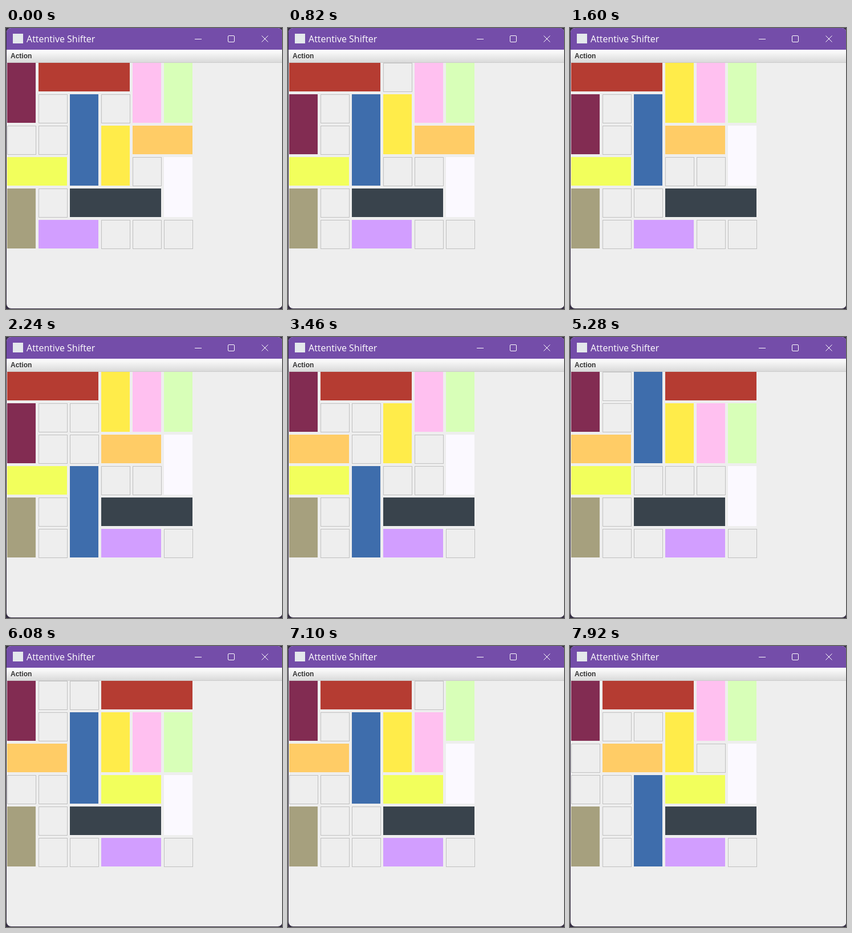
An HTML page with a canvas that plays this animation: 484 px wide and 492 px high, repeating every 8000 ms.

```html
<!DOCTYPE html>
<html lang="en">
<head>
<meta charset="utf-8">
<title>Sliding blocks</title>
<style>
html, body { margin: 0; width: 100%; height: 100%; overflow: hidden; background: #eee; }
canvas { display: block; width: 484px; height: 492px; }
</style>
</head>
<body>
<canvas id="stage" width="484" height="492"></canvas>
<script>
const ctx = document.getElementById('stage').getContext('2d');
const LOOP = 8000, GRID = 6, PITCH = 55, CELL = 50, LEFT = 2, TOP = 61;

// Each block: axis, fixed lane, length, starting position, colour.
const blocks = {
  M: ['v', 0, 2, 0, '#822c52'],
  R: ['h', 0, 3, 1, '#b53c32'],
  P: ['v', 4, 2, 0, '#ffc0f0'],
  G: ['v', 5, 2, 0, '#d8ffb8'],
  B: ['v', 2, 3, 1, '#3e6dac'],
  Y: ['v', 3, 2, 2, '#ffec4a'],
  O: ['h', 2, 2, 4, '#ffcc66'],
  L: ['h', 3, 2, 0, '#f2ff5c'],
  W: ['v', 5, 2, 3, '#fbf9ff'],
  K: ['v', 0, 2, 4, '#a6a07e'],
  D: ['h', 4, 3, 2, '#39434c'],
  U: ['h', 5, 2, 1, '#d29eff']
};

// One-cell moves: + is right or down, - is left or up.
const moves = (
  'M+ R- U+ Y- Y- O- ' +
  'W- D+ U+ B+ B+ O- ' +
  'O- Y+ R+ M- O- B- ' +
  'B- P+ D- W+ R+ G+ ' +
  'R+ B- L+ L+ L+ B+ ' +
  'R- G- W- R- D+ B+ ' +
  'B+ P- O+').split(' ');

const times = [
  220, 420, 620, 820, 1020, 1220,
  1430, 1600, 1830, 2030, 2240, 2440,
  2640, 2840, 3050, 3250, 3460, 3660,
  3870, 4070, 4270, 4480, 4680, 4880,
  5080, 5280, 5480, 5680, 5880, 6080,
  6290, 6490, 6690, 6900, 7100, 7300,
  7520, 7720, 7920
];

function fill(color, x, y, w, h) {
  ctx.fillStyle = color;
  ctx.fillRect(x, y, w, h);
}

function text(str, x, y, font, color) {
  ctx.font = font;
  ctx.fillStyle = color;
  ctx.fillText(str, x, y);
}

function drawButtons() {
  ctx.strokeStyle = '#fff';
  ctx.lineWidth = 1;
  ctx.beginPath();
  ctx.moveTo(331, 19.5);
  ctx.lineTo(343, 19.5);
  ctx.roundRect(389.5, 13.5, 11, 11, 1.5);
  ctx.moveTo(448.5, 13.5);
  ctx.lineTo(459.5, 24.5);
  ctx.moveTo(459.5, 13.5);
  ctx.lineTo(448.5, 24.5);
  ctx.stroke();
}

function drawWindow() {
  fill('#352d42', 0, 0, 484, 492);
  ctx.save();
  ctx.beginPath();
  ctx.roundRect(1, 0, 483.5, 491, 8);
  ctx.clip();
  fill('#eee', 0, 0, 484, 492);
  fill('#744da9', 0, 0, 484, 38);
  const shade = ctx.createLinearGradient(0, 38, 0, 60);
  shade.addColorStop(0, '#fff');
  shade.addColorStop(1, '#dadada');
  fill(shade, 0, 38, 484, 22);
  fill('#ccc', 0, 60, 484, 1);
  ctx.restore();

  fill('#e4e8ec', 12, 10, 18, 17);
  text('Attentive Shifter', 36, 25, '16px "Open Sans", "Noto Sans", sans-serif', '#fff');
  text('Action', 8, 53, 'bold 12px "Liberation Sans", Arial, sans-serif', '#333');
  drawButtons();
}

function positionsAt(t) {
  const pos = {};
  for (const id in blocks) pos[id] = blocks[id][3];
  moves.forEach(([id, sign], i) => {
    if (t >= times[i]) pos[id] += sign === '+' ? 1 : -1;
  });
  return pos;
}

function drawBoard(pos) {
  const used = new Set();
  for (const id in blocks) {
    const [axis, lane, len, , color] = blocks[id];
    const across = axis === 'h';
    const col = across ? pos[id] : lane;
    const row = across ? lane : pos[id];
    const span = CELL + PITCH * (len - 1);
    fill(color, LEFT + col * PITCH, TOP + row * PITCH,
      across ? span : CELL, across ? CELL : span);
    for (let i = 0; i < len; i++) {
      used.add(across ? row * GRID + col + i : (row + i) * GRID + col);
    }
  }
  ctx.strokeStyle = '#c0c0c0';
  ctx.lineWidth = 1;
  for (let i = 0; i < GRID * GRID; i++) {
    if (used.has(i)) continue;
    const x = LEFT + (i % GRID) * PITCH, y = TOP + Math.floor(i / GRID) * PITCH;
    ctx.strokeRect(x + 0.5, y + 0.5, CELL, CELL);
  }
}

const start = performance.now();

function frame() {
  const t = (performance.now() - start) % LOOP;
  drawWindow();
  drawBoard(positionsAt(t));
  requestAnimationFrame(frame);
}
frame();
</script>
</body>
</html>
```
